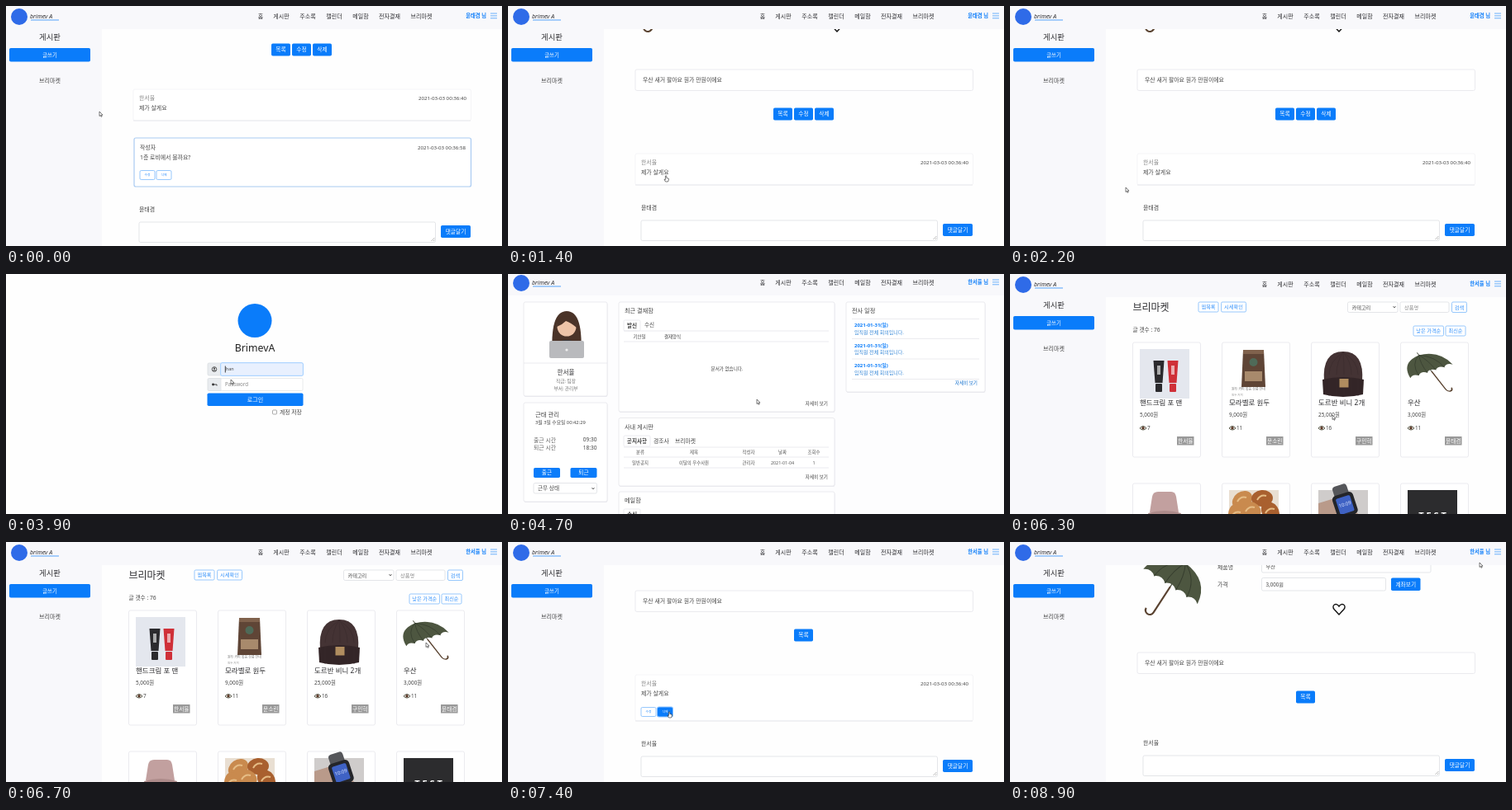
Write an HTML page that moves like this. It is 600x291 px and loops after 9000 ms.

```html
<!DOCTYPE html>
<html lang="ko">
<head>
<meta charset="utf-8">
<style>
html, body { margin: 0; width: 100%; height: 100%; overflow: hidden; background: #fefefe }
svg { display: block; font-family: "Noto Sans", "Noto Sans CJK KR", "Noto Sans CJK JP", sans-serif; white-space: pre }
</style>
</head>
<body>
<svg id="stage" width="600" height="291" viewBox="0 0 600 291"></svg>
<script>
const BLUE = '#0a7cfa', SKY = '#6ab0fb', INK = '#444', DARK = '#2d2d30', GREY = '#888', LINE = '#e2e3e8', PALE = '#f8f8fb';
const SELLER = '윤태겸', BUYER = '한서율', MARKET = '브리마켓';

// Text is placed by its vertical centre.
const text = (x, y, s, size = 6.9, fill = INK, anchor = 'start', extra = '') =>
  `<text x="${x}" y="${y + size * .37}" font-size="${size}" fill="${fill}" text-anchor="${anchor}" ${extra}>${s}</text>`;
const mid = (x, y, s, size, fill, extra) => text(x, y, s, size, fill, 'middle', extra);
const end = (x, y, s, size, fill, extra) => text(x, y, s, size, fill, 'end', extra);
const rect = (x, y, w, h, fill = '#fff', stroke = 'none', r = 0, extra = '') =>
  `<rect x="${x}" y="${y}" width="${w}" height="${h}" fill="${fill}" stroke="${stroke}" stroke-width=".7" rx="${r}" ${extra}/>`;
const path = (d, stroke = INK, width = 1, fill = 'none') =>
  `<path d="${d}" stroke="${stroke}" stroke-width="${width}" fill="${fill}"/>`;
const shape = (d, fill) => path(d, 'none', 0, fill);
const circle = (x, y, r, fill, stroke = 'none') => `<circle cx="${x}" cy="${y}" r="${r}" fill="${fill}" stroke="${stroke}"/>`;
const group = (s, transform = '', id = '') => `<g id="${id}" transform="${transform}">${s}</g>`;
const hline = (x1, x2, y, color = LINE) => path(`M${x1} ${y}H${x2}`, color, .7);
const button = (x, y, w, h, s, size = 6.7) =>
  rect(x, y, w, h, BLUE, 'none', 1.8) + mid(x + w / 2, y + h / 2, s, size, '#fff');
const outline = (x, y, w, h, s, size = 6.2) =>
  rect(x, y, w, h, '#fff', SKY, 1.5) + mid(x + w / 2, y + h / 2, s, size, '#2f8ffb');
const field = (x, y, w, h, s = '', fill = INK, size = 6.2) =>
  rect(x, y, w, h, '#fff', '#d8dbe0', 1.8) + text(x + 5, y + h / 2, s, size, fill);
const caret = (x, y) => path(`M${x - 1.5} ${y - 1}l1.5 2l1.5 -2`, '#444', .8);
const card = (x, y, w, h) => rect(x + .5, y + 1, w, h, '#ececf0', 'none', 2) + rect(x, y, w, h, '#fff', LINE, 2);
const bold = 'font-weight="600"', medium = 'font-weight="500"';

function header(user) {
  const nav = [[308, '홈'], [333, '게시판'], [365, '주소록'], [397, '캘린더'], [429, '메일함'], [464, '전자결재'], [502.5, MARKET]];
  return rect(0, 0, 600, 28, PALE) + circle(16, 13, 10, '#2f6be8') +
    text(29, 12, 'brimev A', 7, DARK, 'start', 'font-style="italic" font-weight="500"') +
    hline(30, 64, 17, BLUE) + nav.map(([x, s]) => mid(x, 12, s, 7, DARK, medium)).join('') +
    end(581, 12, user + ' 님', 6.3, BLUE, bold) +
    [9, 11.9, 14.8].map(y => path(`M586 ${y}h8`, SKY, 1)).join('');
}
const sidebar = () => rect(0, 28, 116, 263, PALE) + mid(53, 37.5, '게시판', 9.4, DARK) +
  button(4, 51, 98, 16.5, '글쓰기', 6.4) + mid(53, 90.5, MARKET, 7);

const umbrella = () => {
  let hem = '';
  for (let x = 30; x > -30; x -= 12) hem += `Q${x - 6} -5 ${x - 12} 0`;
  return path('M0 0V29a4 4 0 0 0 8 0', '#5a4331', 1.7) + path('M0 -30V0', '#44483a', 1) +
    shape('M-30 0Q-27 -24 0 -26Q27 -24 30 0' + hem + 'Z', '#4d5640') +
    path('M0 -26Q-17 -18 -18 0M0 -26Q-6 -15 -6 0M0 -26Q6 -15 6 0M0 -26Q17 -18 18 0', '#353c2d', .7);
};

function comment(y, name, words, time, own, framed) {
  const h = own ? (framed ? 59 : 56) : 38, x = framed ? 162 : 161, k = framed ? 1 : 0;
  return (framed ? rect(155, y, 407.5, h, '#fff', '#aacbf2', 2, 'style="stroke-width:1.2"')
                 : rect(154, y, 408.5, h, '#fff', '#f1f1f4', 2) + hline(154, 562, y + h, '#dfe0e5')) +
    text(x, y + 10 + k, name, 6.9, framed ? INK : GREY) + text(x, y + 22 + k, words, 6.9) +
    end(557 - k, y + 10.5 + k, time, 6.15) +
    (own ? outline(x, y + 39.5, 18, 11, '수정', 3.8) + outline(x + 20, y + 39.5, 18, 11, '삭제', 3.8) +
      group(rect(x + 19, y + 38.5, 20, 13, '#8cc2ff', 'none', 2.5) + button(x + 20, y + 39.5, 18, 11, '삭제', 3.8), '', 'hot' + (framed ? 1 : 2)) : '');
}

// Page body of one item; extra is the height taken by its comments.
function post(user, buttons, comments, extra) {
  const x0 = 358.5 - buttons.length * 12.5, y = 259 + extra;
  return group(umbrella(), 'translate(194 54) rotate(33) scale(-1.3 1.3)') +
    text(251, 30, '제품명') + field(304.5, 22, 204.5, 15, '우산') +
    text(251, 51, '가격') + field(304.5, 43.5, 150, 15.5, '3,000원') + button(461, 43.5, 35.5, 15.5, '계좌보기') +
    path('M398 88L392 81.5C388.5 77 394.5 72.5 398 78C401.5 72.5 407.5 77 404 81.5Z', '#111', 1.4) +
    rect(154, 134, 408.5, 25.5, '#fff', LINE, 2) + text(163, 146.5, '우산 새거 팔아요 원가 만원이에요') +
    buttons.map((s, i) => button(x0 + i * 25, 180.5, 23, 15, s)).join('') + comments +
    text(161, y - 16, user) + field(161, y, 358.5, 24.5) +
    path(`M514.5 ${y + 23}l4 -4M517 ${y + 23}l1.5 -1.5`, '#888', .6) + button(526, y + 4, 36, 15, '댓글달기');
}
const page = (id, user, body, dy) => group(group(body, `translate(0 ${dy})`, id + 'Body') + sidebar() + header(user), '', id);
const first = own => comment(236, BUYER, '제가 살게요', '2021-03-03 00:36:40', own);
const reply = comment(295, '작성자', '1층 로비에서 볼까요?', '2021-03-03 00:36:58', true, true);
const owner = ['목록', '수정', '삭제'];

const login = () => rect(0, 0, 600, 291, '#fefefe') + circle(301, 56.5, 20.5, BLUE) +
  mid(301, 89, 'BrimevA', 12.3, '#222', medium) +
  rect(244, 108, 17, 15, '#e9ecef', '#d6dade', 1.5) + circle(252, 115.5, 2.8, 'none', '#555') +
  circle(252, 114.6, 1.1, '#444') + path('M250 117.5q2 -2 4 0', '#444', 1) +
  rect(259, 107, 101, 17, '#c5e0ff', 'none', 2.5) + rect(260, 108, 99, 15, '#fff', '#80bdff', 1.5) +
  group(rect(260.5, 108.5, 98, 14, '#e8f0fe') + text(266, 115.5, 'han', 5.4), '', 'account') +
  path('M265.3 111.5v8', '#111', .8) +
  rect(244, 126.5, 17, 15, '#e9ecef', '#d6dade', 1.5) + circle(250.5, 134, 1.4, '#333') + path('M251 134h4v1.5', '#333', .9) +
  rect(260, 126.5, 99, 15, '#fff', '#e0e3e6', 1.5) + group(text(265, 134, 'Password', 6.2, GREY), '', 'hint') +
  group(text(265, 134, '••••', 6.3), '', 'secret') + button(243.5, 144.5, 116, 15.5, '로그인', 7) +
  rect(322.5, 165, 5, 5, '#fff', '#888', 1) + text(331, 167.5, '계정 저장', 6.8);

function dashboard() {
  const more = (x, y) => end(x, y, '자세히 보기', 5.6, INK, medium);
  const row = (y, cells, size, extra) => [160, 225, 291, 332, 370].map((x, i) => mid(x, y, cells[i], size, '#555', extra)).join('');
  const tab = (x, y, w, s) => rect(x, y, w, 13, '#fff', LINE, 1.5) + mid(x + w / 2, y + 6.5, s, 6.6, INK, bold);
  const events = [62, 86.5, 111].map(y => text(419, y, '2021-01-31(일)', 6, BLUE, 'start', bold) +
    text(419, y + 8.7, '임직원 전체 회의입니다.', 6, '#3385d6') + hline(416, 570, y + 16.5)).join('');
  const avatar = shape('M54 101Q50 45 71 45Q92 45 88 101Z', '#4a3328') + circle(71, 64, 11.5, '#eec4a8') +
    shape('M59 64Q60 50 72 51Q83 52 83 65Q76 59 70 57Q65 62 59 64Z', '#4a3328') +
    shape('M53 102Q53 80 71 80Q89 80 89 102Z', '#38383c') + rect(50, 81, 42, 21, '#b9babd', 'none', 2) + circle(71, 92, 1.6, '#eee');
  return rect(0, 0, 600, 291, '#fdfdfe') + group(header(BUYER), 'translate(0 -2)') +
    card(19, 34, 101, 114) + avatar + hline(19, 120, 108) + mid(70, 119, BUYER, 7.6, DARK, medium) +
    mid(70, 130, '직급: 팀장', 5.7, '#777') + mid(70, 139, '부서: 관리부', 5.7, '#777') +
    card(19, 156, 101, 120) + text(33, 170.5, '근태 관리', 7.4, INK, 'start', medium) +
    text(33, 180, '3월 3일 수요일 <tspan id="clock"></tspan>', 5.8) +
    text(31, 201, '출근 시간', 6.9, '#666') + end(107.5, 201, '09:30', 6.6) +
    text(31, 210.5, '퇴근 시간', 6.9, '#666') + end(107.5, 210.5, '18:30', 6.6) +
    button(31, 235, 32, 12, '출근') + button(75.5, 235, 32, 12, '퇴근') +
    field(31, 253.5, 76.5, 12.5, '근무 상태', INK, 6.6) + caret(103, 260) +
    card(134, 34, 261, 133) + text(141, 44.5, '최근 결재함', 7.2, INK, 'start', medium) +
    tab(140, 56, 20, '발신') + text(165, 62, '수신', 6.6) + hline(140, 388, 69) +
    mid(159, 76, '기안일', 5.5, INK, medium) + mid(199, 76, '결재양식', 5.5, INK, medium) + hline(140, 388, 82) +
    mid(265, 114.5, '문서가 없습니다.', 5.6) + more(387, 157) +
    card(134, 174.5, 261, 82.5) + text(141, 185, '사내 게시판', 7.2, INK, 'start', medium) +
    tab(140, 196, 32, '공지사항') + text(176, 202, '경조사', 6.8) + text(202, 202, MARKET, 6.8) + hline(140, 388, 210) +
    row(216.5, ['분류', '제목', '작성자', '날짜', '조회수'], 5.4, medium) + hline(140, 388, 222) +
    row(229, ['일반공지', '이달의 우수사원', '관리자', '2021-01-04', '1'], 5.4) + hline(140, 388, 235) + more(387, 246) +
    card(134, 264, 261, 50) + text(141, 274, '메일함', 7.2, INK, 'start', medium) + tab(140, 285, 20, '수신') +
    card(409, 34, 168, 109) + text(416, 44.5, '전사 일정', 7.2, INK, 'start', medium) + hline(416, 570, 54.5) + events +
    end(568, 132, '자세히 보기', 5.6, '#1672cf', medium) + group(popup(), '', 'popup');
}
const popup = () => rect(210, -4, 182, 115, '#0002', 'none', 3) + rect(211, -5, 180, 113.5, '#fff', '#bbb', 2) +
  rect(211.5, 0, 179, 41, '#f8f9fa') + path('M218 34C240 30 230 12 256 14M212 12l22 -12M340 5q18 -8 25 9', '#e3e5e8', 1.5) +
  rect(250, 2, 40, 11, '#e8eaed', 'none', 2) + rect(310, 0, 30, 34, '#f0f1f3', 'none', 2) + circle(232, 23, 4, '#e6e8eb') +
  rect(375, 19, 9, 2.5, '#dfe1e5', 'none', 1) + rect(264, 12, 48, 18, '#fff', '#d5d8dc', 2) +
  [284, 290, 296].map(x => circle(x, 21, 1.6, '#4285f4')).join('') + path('M301 17v8', '#4285f4', 1) +
  path('M270 13L279 28H261Z', '#d93025', 2, '#d93025') + path('M270 17v6M270 24.5v1.7', '#fff', 1.5) +
  text(219, 53, '비밀번호 변경', 7.3, DARK) +
  text(219, 66, '사이트 또는 앱의 정보 유출로 인해 비밀번호가 노출되었습니다. 지금', 5.35, '#555') +
  text(219, 75.5, 'intranet:4040의 비밀번호를 변경하는 것이 좋습니다.', 5.35, '#555') +
  circle(221.5, 96, 2.4, '#fff', '#555') + path('M221.5 95.5v2', '#555', .7) +
  rect(358.5, 89.5, 25.5, 13, '#3f83e8', 'none', 1.5) + mid(371, 96, '확인', 5.6, '#fff');

// Thumbnails use a 60 by 60 box.
const tube = (x, color) => shape(`M${x} 14h13l-2 27h-9Z`, color) + rect(x + 2.5, 42, 8, 10, color, 'none', 1) + rect(x + 4.5, 20, 4, 11, '#fff9');
const nugget = (x, y, i) => `<ellipse cx="${x}" cy="${y}" rx="13" ry="10" fill="${i % 2 ? '#a9602f' : '#c98a4e'}" transform="rotate(${-35 + i * 30} ${x} ${y})"/>` +
  path(`M${x - 6} ${y + 2}q4 -7 11 -5`, '#e6bd86', 2);
const thumbs = [
  rect(0, 0, 60, 60, '#e4e7ee') + tube(16.5, '#2b2a2d') + tube(33.5, '#cf3038'),
  shape('M17 1H42L44 46H15Z', '#5f4536') + shape('M17 1H42V6H17Z', '#80624d') +
    circle(29.5, 16, 5, '#4f6a58') + rect(19, 27, 21, 12, '#a88a6c') +
    text(3, 49, '원두 커피 볶음 상품 안내', 4, '#777') + text(3, 56, '원두 커피', 3.5, '#999'),
  shape('M7 40Q4 3 30 3Q56 3 53 40Z', '#443334') + shape('M5 37Q30 31 55 37L54 55Q30 61 6 55Z', '#332527') +
    [13, 22, 31, 40, 48].map(x => path(`M${x} 35V57M${x} 31Q${x} 15 30 4`, '#3a2a2c', .6)).join('') + rect(25.5, 36, 11, 10.5, '#b08d5f'),
  group(umbrella(), 'translate(29 27) rotate(-18) skewX(20) scale(.9)'),
  shape('M15 8Q16 2 22 2H38Q43 2 44 8L47 27Q30 32 12 27Z', '#c2a09f') + shape('M10 28Q30 22 50 28L47 36H12Z', '#ad8b8a') + path('M15 35L9 60M45 35L50 60', '#777', 2),
  rect(0, 0, 60, 60, '#e9dfd2') + [[16, 12], [40, 10], [26, 24], [50, 26], [9, 30]].map(([x, y], i) => nugget(x, y, i)).join(''),
  rect(0, 0, 60, 60, '#cfcccb') + shape('M0 16L26 8L60 40V60H0Z', '#b99a8a') +
    group(rect(-9, -24, 18, 60, '#55565a', 'none', 4) + rect(-13, -13, 26, 28, '#242529', 'none', 5) + rect(-9, -9, 18, 20, '#3f62c4', 'none', 2) +
      mid(0, 0, '10:09', 6, '#dce6ff'), 'translate(32 17) rotate(-18)'),
  rect(0, 0, 60, 60, '#2c2c2e') + mid(30, 31, 'T E S T', 11, '#fff', bold)
];
function market() {
  const goods = [['핸드크림 포 맨', '5,000', 7, BUYER], ['모라벨로 원두', '9,000', 11, '문소린'],
    ['도르반 비니 2개', '25,000', 16, '구민혁'], ['우산', '3,000', 11, SELLER]];
  const cards = thumbs.map((thumb, i) => {
    const item = goods[i];
    return group(rect(0, 0, 82, 139, '#fff', LINE, 2) + group(thumb, 'translate(8.5 8)') + (item ?
      text(8.5, 73, item[0], 8.5, DARK) + text(8.5, 88, item[1] + '원', 6.4) +
      path('M8.5 104Q12.5 99 16.5 104Q12.5 108 8.5 104Z', '#443', .9) + circle(12.5, 103.7, 1.7, '#5b3826') +
      text(17.5, 104, item[2], 6.3) + rect(53.5, 114, 20.5, 10.5, '#999') + mid(63.75, 119.2, item[3], 6.7, '#fff') : ''),
      `translate(${148.5 + i % 4 * 108} ${i < 4 ? 83 : 254})`);
  }).join('');
  return text(148.5, 40.5, MARKET, 12, DARK) + outline(228, 34, 24, 12, '찜목록') + outline(255.5, 34, 30, 12, '시세확인') +
    field(408.5, 34, 60.5, 12.5, '카테고리') + caret(465, 40) + field(472, 34, 59, 12.5, '상품명', GREY) +
    outline(534.5, 34, 18, 12.5, '검색') + text(148.5, 67.5, '글 갯수 : 76', 6.7) +
    outline(488, 63, 36.5, 12, '낮은 가격순') + outline(527, 63, 24, 12, '최신순') + cards;
}

const $ = id => document.getElementById(id);
$('stage').innerHTML = rect(0, 0, 600, 291, '#fefefe') +
  page('talk', SELLER, post(SELLER, owner, first() + reply, 138), -135) +
  page('trimmed', SELLER, post(SELLER, owner, first(), 58), -57) +
  group(login(), '', 'login') + group(dashboard(), '', 'dash') +
  page('market', BUYER, market(), 0) +
  page('offer', BUYER, post(BUYER, ['목록'], first(true), 76), 70) +
  page('empty', BUYER, post(BUYER, ['목록'], '', 0), 0) +
  group(group(path('M0 0V5.5L1.3 4.4L2.2 6.3L3.1 5.9L2.3 4.1H4Z', '#222', .6, '#fff'), '', 'arrow') +
    group(path('M-.6 0Q.2 -.7 .8 0V2.5L3.3 3.2V5L2.5 7H-.5L-2 4.2L-.6 4.5Z', '#222', .6, '#fff'), '', 'hand'), '', 'cursor');

const scenes = [[0, 'talk'], [1300, 'trimmed'], [3200, 'login'], [4600, 'dash'], [6000, 'market'], [7000, 'offer'], [8000, 'empty']];
const track = [[0, 113, 128], [900, 191, 206], [1400, 191, 206], [1900, 150, 220], [2200, 140, 220], [2400, 134, 218],
  [3000, 576, 11], [3300, 576, 11], [3700, 272, 128], [4200, 272, 128], [4500, 301, 152], [4700, 301, 152], [5000, 495, 10],
  [5100, 495, 10], [5400, 371, 96], [5500, 371, 96], [5800, 495, 10], [6000, 495, 10], [6300, 390, 171],
  [6700, 508, 122], [7000, 508, 122], [7400, 195, 206], [8200, 195, 206], [8800, 568, 25], [9000, 568, 25]];
const show = (id, on) => $(id).style.display = on ? '' : 'none';
const ease = (t, a, b) => { const p = Math.min(1, Math.max(0, (t - a) / (b - a))); return p * p * (3 - 2 * p); };

function draw(t) {
  const now = scenes.findLast(s => s[0] <= t)[1];
  scenes.forEach(([, id]) => show(id, id === now));
  show('hot1', t >= 900);
  show('hot2', t >= 7400);
  show('account', t >= 3700);
  show('hint', t < 4200);
  show('secret', t >= 4200);
  show('popup', t >= 4900 && t < 5500);
  $('clock').textContent = '00:42:' + (31 + Math.floor((t - 5100) / 300));
  $('offerBody').setAttribute('transform', `translate(0 ${70 - 145 * ease(t, 7000, 7300)})`);
  const i = track.findLastIndex(k => k[0] <= t), [a, x, y] = track[i], [b, x2, y2] = track[i + 1], p = ease(t, a, b);
  $('cursor').setAttribute('transform', `translate(${x + (x2 - x) * p} ${y + (y2 - y) * p})`);
  const pointing = t >= 900 && t < 1500 || t >= 7400 && t < 8200;
  show('hand', pointing);
  show('arrow', !pointing);
}
const start = performance.now();
(function tick() {
  draw(Math.floor((performance.now() - start) % 9000 / 100) * 100);
  requestAnimationFrame(tick);
})();
</script>
</body>
</html>
```
